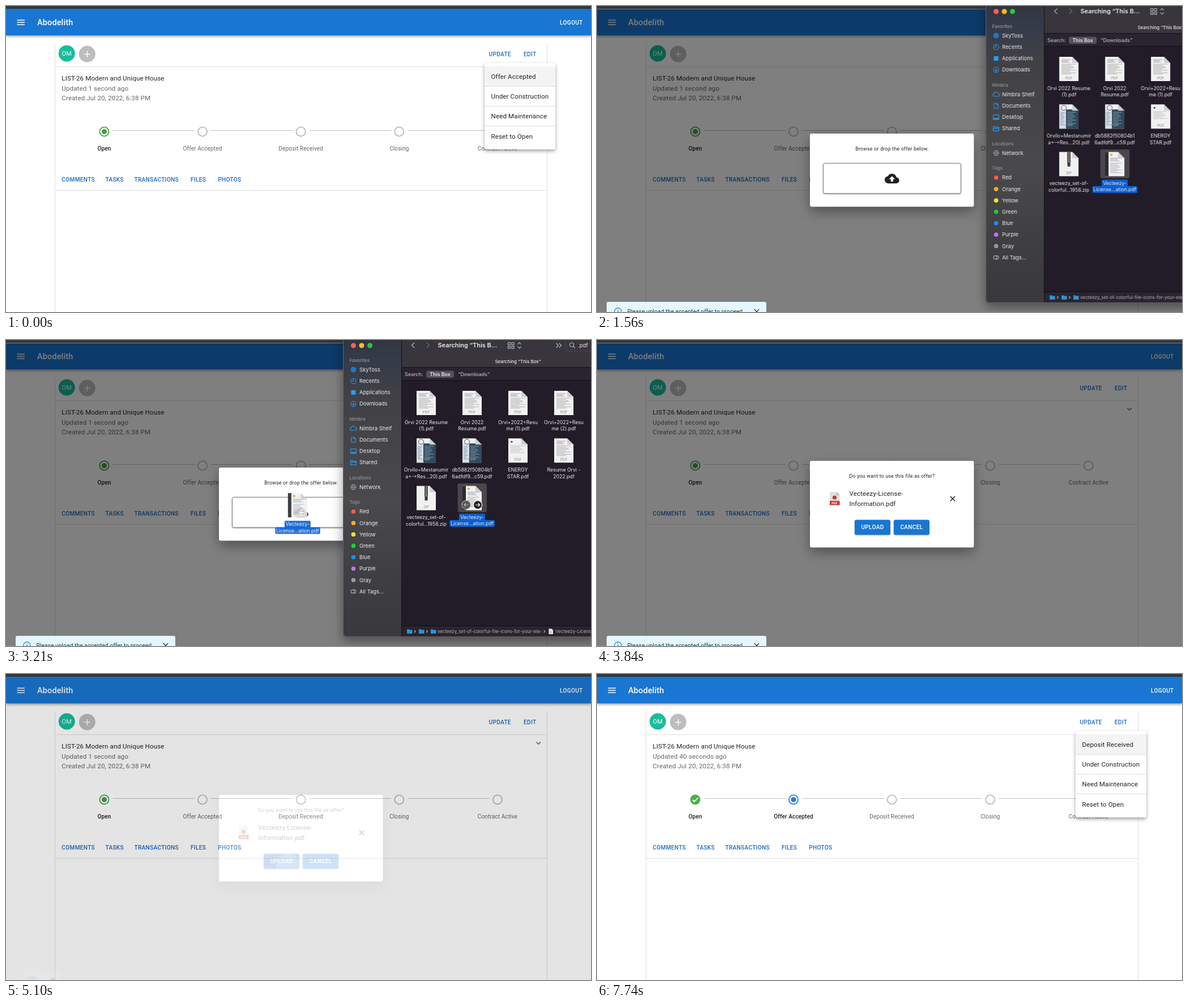
Write an HTML page that moves like this. It is 1033 px wide and 542 px high and loops after 8 s.

```html
<!DOCTYPE html>
<html lang="en">
<head>
<meta charset="utf-8">
<title>Listing workflow</title>
<style>
html, body { margin: 0; width: 100%; height: 100%; overflow: hidden; background: #fff; }
svg { display: block; width: 100vw; height: 100vh; }
text { white-space: pre; }
.ui { font: 400 11.6px Roboto, sans-serif; letter-spacing: .00938em; fill: #212121; }
.ui .soft { fill: #666; }
.ui .btn { font-size: 10.13px; font-weight: 500; letter-spacing: .02857em; fill: #1f6cbc; }
.ui .white { fill: #fff; }
.ui .cap { font-size: 8.7px; letter-spacing: .0333em; }
.ui .step { font-size: 10.13px; letter-spacing: .00714em; }
.ui .on { font-weight: 500; fill: #212121; }
.mid, .step, .cap { text-anchor: middle; }
.line { fill: none; stroke: #e0e0e0; }
.ring { fill: none; stroke: #b9b9b9; stroke-width: 1.8; }
.files { font: 400 9.4px Inter, sans-serif; fill: #eceaee; }
.files .head { font-size: 8px; font-weight: 600; fill: #8d8b92; }
.files .name { font-size: 8.7px; text-anchor: middle; }
.files .tag { font-size: 6.5px; text-anchor: middle; fill: #8b8b8b; }
.files .path { font-size: 8px; fill: #b5b2b9; }
.files .icon { fill: none; stroke: #2c9cf0; stroke-width: 1.1; }
.glyph { fill: none; stroke: #b9b6bd; stroke-width: 1.2; stroke-linecap: round; stroke-linejoin: round; }

#menu { filter: drop-shadow(0 3px 3px rgba(0,0,0,.36)); transform-origin: 920px 101px; }
.paper { filter: drop-shadow(0 9px 11px rgba(0,0,0,.36)); }
.raised { filter: drop-shadow(0 1.5px 1px rgba(0,0,0,.35)); }
#finder { filter: drop-shadow(0 7px 10px rgba(0,0,0,.4)); }
#toast { transform-origin: 158px 541px; }
#press { transform-origin: 498px 338px; }
#ripple { transform-origin: 874px 85px; }

#menu, #modal, #toast, #finder, #drag, #upload, #press, #hover, #ripple,
.before, .after, #ask, #confirm, #wide, #narrow, #arrows {
  animation: 8s linear infinite;
}
#menu { animation-name: menu; }
#modal { animation-name: modal; }
#toast { animation-name: toast; }
#finder { animation-name: finder; }
#drag { animation-name: drag; }
#upload { animation-name: upload; }
#press { animation-name: press; }
#hover { animation-name: hover; }
#ripple { animation-name: ripple; }
.before { animation-name: before; animation-timing-function: step-end; }
.after { animation-name: after; animation-timing-function: step-end; }
#ask { animation-name: ask; animation-timing-function: step-end; }
#confirm { animation-name: confirm; animation-timing-function: step-end; }
#wide { animation-name: wide; animation-timing-function: step-end; }
#narrow { animation-name: narrow; animation-timing-function: step-end; }
#arrows { animation-name: arrows; animation-timing-function: step-end; }

@keyframes menu {
  0%, 3% { opacity: 1; transform: none; animation-timing-function: cubic-bezier(.4,0,.2,1); }
  5.8% { opacity: 0; transform: scale(.75,.5625); }
  88.125% { opacity: 0; transform: scale(.75,.5625); animation-timing-function: cubic-bezier(.4,0,.2,1); }
  91.6%, 100% { opacity: 1; transform: none; }
}
@keyframes modal {
  0%, 3.2% { opacity: 0; animation-timing-function: cubic-bezier(.4,0,.2,1); }
  6.2%, 62.375% { opacity: 1; animation-timing-function: cubic-bezier(.4,0,.2,1); }
  65.1%, 100% { opacity: 0; }
}
@keyframes toast {
  0%, 3.375% { opacity: 0; transform: scale(.75,.5625); animation-timing-function: cubic-bezier(.4,0,.2,1); }
  6.6%, 62.375% { opacity: 1; transform: none; animation-timing-function: cubic-bezier(.4,0,.2,1); }
  65.1%, 100% { opacity: 0; transform: scale(.9,.8); }
}
@keyframes finder {
  0%, 17.5% { transform: translateX(475px); visibility: hidden; }
  17.51% { transform: translateX(475px); visibility: visible; animation-timing-function: cubic-bezier(.25,.5,.3,1); }
  22.125%, 46.49% { transform: none; visibility: visible; }
  46.5%, 100% { transform: none; visibility: hidden; }
}
@keyframes drag {
  0%, 31.86% { opacity: 0; transform: none; }
  31.875% { opacity: .9; transform: none; animation-timing-function: cubic-bezier(.4,.1,.4,1); }
  40.125% { opacity: .9; transform: translate(-308px,12.5px); animation-timing-function: ease-out; }
  41.625%, 42.37% { opacity: .9; transform: translate(-319px,21.5px); }
  42.375%, 100% { opacity: 0; transform: translate(-319px,21.5px); }
}
@keyframes upload {
  0%, 57.375% { fill: #1976d2; }
  60.5%, 100% { fill: #1565c0; }
}
@keyframes press {
  0%, 61.5% { transform: scale(0); opacity: .2; }
  65.25%, 100% { transform: scale(1); opacity: .25; }
}
@keyframes hover {
  0%, 86.5% { opacity: 0; }
  88.125% { opacity: .05; }
  91%, 100% { opacity: 0; }
}
@keyframes ripple {
  0%, 86.9% { opacity: .1; transform: scale(0); }
  88.5% { opacity: .26; transform: scale(.6); }
  91% { opacity: .14; transform: scale(1); }
  94.1%, 100% { opacity: 0; transform: scale(1); }
}
@keyframes before { 0% { opacity: 1; } 71.625%, 100% { opacity: 0; } }
@keyframes after { 0% { opacity: 0; } 71.625%, 100% { opacity: 1; } }
@keyframes ask { 0% { opacity: 1; } 46.5%, 100% { opacity: 0; } }
@keyframes confirm { 0% { opacity: 0; } 46.5%, 100% { opacity: 1; } }
@keyframes wide { 0% { opacity: 1; } 62.25%, 100% { opacity: 0; } }
@keyframes narrow { 0% { opacity: 0; } 62.25%, 100% { opacity: 1; } }
@keyframes arrows { 0% { opacity: 0; } 25.5%, 100% { opacity: 1; } }
</style>
</head>
<body>
<svg viewBox="0 0 1033 542">
  <defs>
    <linearGradient id="side" x1="0" y1="0" x2="0" y2="1">
      <stop offset="0" stop-color="#33343b"/><stop offset=".08" stop-color="#343b49"/>
      <stop offset=".2" stop-color="#414145"/><stop offset=".55" stop-color="#4a494c"/>
      <stop offset=".8" stop-color="#3f3e42"/><stop offset="1" stop-color="#39383c"/>
    </linearGradient>
    <clipPath id="uploadBox"><rect x="455" y="318.5" width="63" height="26.5" rx="3"/></clipPath>
    <clipPath id="updateBox"><rect x="844" y="72" width="59" height="27" rx="3"/></clipPath>
    <path id="times" d="M-4.2-4.2L4.2 4.2M4.2-4.2L-4.2 4.2"/>
  </defs>

  <g class="ui">
    <rect width="1033" height="542" fill="#fff"/>
    <path class="line" d="M86.5 66V542M955.5 66V542M86 107.5H956M86 326.5H956"/>
    <rect y="5" width="1033" height="47" fill="#1976d2" style="filter:drop-shadow(0 2px 2px rgba(0,0,0,.38))"/>
    <path d="M19.5 25H33M19.5 29H33M19.5 33H33" stroke="#fff" stroke-width="1.5"/>
    <text x="55" y="34" class="white" style="font-size:14.5px;font-weight:500">Abodelith</text>
    <text x="978" y="32.5" class="btn white" style="fill:#fff">LOGOUT</text>

    <circle cx="107.3" cy="84" r="14.5" fill="#1abc9c"/>
    <text x="107.3" y="88" class="mid white" style="font-size:11px">OM</text>
    <circle cx="143.3" cy="85" r="14.5" fill="#bdbdbd"/>
    <path d="M138 85.5H149M143.5 80V91" stroke="#fff" stroke-width="1.5"/>

    <g clip-path="url(#updateBox)" fill="#1976d2">
      <rect id="hover" x="844" y="72" width="59" height="27"/>
      <circle id="ripple" cx="874" cy="85" r="33"/>
    </g>
    <text x="852.5" y="89" class="btn">UPDATE</text>
    <text x="914" y="89" class="btn">EDIT</text>

    <text x="98.3" y="132">LIST-26 Modern and Unique House</text>
    <text x="98.3" y="149.5" class="soft before">Updated 1 second ago</text>
    <text x="98.3" y="149.5" class="soft after">Updated 40 seconds ago</text>
    <text x="98.3" y="166.5" class="soft">Created Jul 20, 2022, 6:38 PM</text>
    <path d="M936.5 120.5L940.3 124.3L944.1 120.5" fill="none" stroke="#616161" stroke-width="1.5"/>

    <g id="steps"></g>
    <g class="before" fill="#43a047">
      <circle cx="173.5" cy="222.5" r="8.1" fill="none" stroke="#43a047" stroke-width="1.8"/>
      <circle cx="173.5" cy="222.5" r="4.6"/>
      <text x="347" y="255.5" class="step soft">Offer Accepted</text>
    </g>
    <g class="before"><circle cx="347" cy="222.5" r="8.1" class="ring"/></g>
    <g class="after">
      <circle cx="173.5" cy="222.5" r="9" fill="#4caf50"/>
      <path d="M168.7 222.8L172 226L178.4 219.4" fill="none" stroke="#fff" stroke-width="1.8"/>
      <circle cx="347" cy="222.5" r="8.1" fill="none" stroke="#1e7fd8" stroke-width="1.8"/>
      <circle cx="347" cy="222.5" r="4.6" fill="#1e7fd8"/>
      <text x="347" y="255.5" class="step on">Offer Accepted</text>
    </g>

    <text x="98.3" y="311" class="btn">COMMENTS</text>
    <text x="175.6" y="311" class="btn">TASKS</text>
    <text x="226.5" y="311" class="btn">TRANSACTIONS</text>
    <text x="326" y="311" class="btn">FILES</text>
    <text x="374.3" y="311" class="btn">PHOTOS</text>

    <g id="menu">
      <rect x="845" y="101" width="125" height="153" rx="3" fill="#fff"/>
      <rect x="845" y="107" width="125" height="35" fill="#f4f4f4"/>
      <path class="line" d="M845 142.5H970M845 177.5H970M845 212.5H970"/>
      <text x="856.5" y="128.5" class="before">Offer Accepted</text>
      <text x="856.5" y="128.5" class="after">Deposit Received</text>
      <text x="856.5" y="164">Under Construction</text>
      <text x="856.5" y="199">Need Maintenance</text>
      <text x="856.5" y="234.5">Reset to Open</text>
    </g>

    <g id="modal">
      <rect y="5" width="1033" height="537" fill="#000" opacity=".5"/>
      <rect width="1033" height="5" fill="#4a4a4a"/>
      <path d="M0 5.5H1033" stroke="#777"/>
      <g id="ask">
        <rect class="paper" x="376" y="226" width="289.5" height="129.5" rx="3" fill="#fff"/>
        <text x="521" y="256" class="cap">Browse or drop the offer below.</text>
        <rect class="raised" x="399.5" y="278.5" width="243" height="53.5" rx="3" fill="#fff" stroke="#757575"/>
        <path transform="translate(508 292.8) scale(1.07)" d="M19.35 10.04C18.67 6.59 15.64 4 12 4 9.11 4 6.6 5.64 5.35 8.04 2.34 8.36 0 10.91 0 14c0 3.31 2.69 6 6 6h13c2.76 0 5-2.24 5-5 0-2.64-2.05-4.78-4.65-4.96zM14 13v4h-4v-4H7l5-5 5 5h-3z"/>
      </g>
      <g id="confirm">
        <rect class="paper" x="376" y="214" width="289.5" height="153.5" rx="3" fill="#fff"/>
        <text x="521" y="244" class="cap">Do you want to use this file as offer?</text>
        <path d="M411 269h12l5.5 5.5V292.5H411z" fill="#e2dfdc"/>
        <path d="M423 269l5.5 5.5H423z" fill="#bdb9b5"/>
        <circle cx="419.5" cy="279" r="3.6" fill="#c8382d"/>
        <rect x="411" y="285" width="17.5" height="7.5" fill="#c8382d"/>
        <text x="419.7" y="291" class="mid white" style="font-size:5.6px;font-weight:700">PDF</text>
        <text x="445.5" y="276">Vecteezy-License-</text>
        <text x="445.5" y="293.5">Information.pdf</text>
        <use href="#times" x="628" y="281" stroke="#212121" stroke-width="1.5"/>
        <g class="raised">
          <rect id="upload" x="455" y="318.5" width="63" height="26.5" rx="3"/>
          <rect x="524" y="318.5" width="63" height="26.5" rx="3" fill="#1976d2"/>
        </g>
        <g clip-path="url(#uploadBox)"><circle id="press" cx="498" cy="338" r="35" fill="#fff"/></g>
        <text x="486.5" y="335" class="btn mid" style="fill:#fff">UPLOAD</text>
        <text x="555.5" y="335" class="btn mid" style="fill:#fff">CANCEL</text>
      </g>
    </g>

    <g id="toast">
      <g id="wide">
        <rect x="17" y="524" width="282" height="35" rx="3" fill="#e5f6fd"/>
        <text x="53.5" y="545" style="font-size:10.13px;letter-spacing:.01071em;fill:#014361">Please upload the accepted offer to proceed.</text>
        <use href="#times" x="282" y="541.5" stroke="#014361" stroke-width="1.3"/>
      </g>
      <g id="narrow">
        <rect x="17" y="524" width="75.5" height="35" rx="3" fill="#e5f6fd"/>
        <use href="#times" x="76" y="541.5" stroke="#014361" stroke-width="1.3"/>
      </g>
      <circle cx="37" cy="541" r="6.2" fill="none" stroke="#0288d1" stroke-width="1.2"/>
      <path d="M37 537.5v1.4M37 540v4" stroke="#0288d1" stroke-width="1.3"/>
    </g>
    <rect width="1033" height="5" fill="#35383b"/>
  </g>

  <g id="finder" class="files">
    <path d="M595-10H1045V526H602a7 7 0 0 1-7-7z" fill="#211c27"/>
    <path d="M595-10H698V526H602a7 7 0 0 1-7-7z" fill="url(#side)"/>
    <rect x="699" y="-10" width="346" height="58" fill="#38353d"/>
    <rect x="699" y="49" width="346" height="22.5" fill="#29242f"/>
    <rect x="699" y="507" width="346" height="19" fill="#29252e"/>
    <path d="M698.5-10V526M699 48.5H1045M699 71.5H1045M699 506.5H1045" stroke="#121016"/>
    <path d="M595.5-10V519a7 7 0 0 0 7 6.5H1045" fill="none" stroke="#706e74" stroke-width=".8"/>
    <circle cx="613.5" cy="9.7" r="4.5" fill="#ff5f57"/>
    <circle cx="628" cy="9.7" r="4.5" fill="#febc2e"/>
    <circle cx="642.5" cy="9.7" r="4.5" fill="#28c840"/>
    <g id="places"></g>

    <path class="glyph" d="M721 5l-4.5 4.3 4.5 4.3M904 7.2l2.6-2.8 2.6 2.8M904 11.8l2.6 2.8 2.6-2.8M972 6l3.5 3.5-3.5 3.5M977 6l3.5 3.5-3.5 3.5M1001.8 11.3l2.6 2.7M886.5 4.5h4v4h-4zM893 4.5h4v4h-4zM886.5 10.8h4v4h-4zM893 10.8h4v4h-4z"/>
    <path class="glyph" d="M743 5l4.5 4.3-4.5 4.3" opacity=".45"/>
    <circle class="glyph" cx="999" cy="8.5" r="3.5"/>
    <path d="M1045 19.5H992a4 4 0 0 1-4-4V0" fill="none" stroke="#4b4850"/>
    <text x="762.5" y="13.3" style="font-size:10.9px;font-weight:600">Searching “This B…</text>
    <text x="1010" y="13">.pdf</text>
    <text x="904" y="41" class="mid" style="font-size:8px;font-weight:500">Searching “This Box”</text>
    <rect x="742" y="54.5" width="49" height="12.5" rx="3" fill="#55515b"/>
    <g style="font-size:8.8px;font-weight:600">
      <text x="704" y="63.7" fill="#aaa7ae">Search:</text>
      <text x="766.5" y="63.7" class="mid">This Box</text>
      <text x="798" y="63.7" fill="#aaa7ae">“Downloads”</text>
    </g>
    <rect x="797.5" y="254" width="51.5" height="51" rx="3" fill="#49464d"/>
    <g id="docs"></g>
    <g id="picked"></g>
    <g id="arrows" stroke="#fff" stroke-width="1.2">
      <circle cx="812.5" cy="292" r="7.6" fill="#555" stroke="#aaa"/>
      <circle cx="833" cy="292" r="7.6" fill="#222"/>
      <path d="M816.3 292h-7.4m3-3l-3 3 3 3" fill="none" stroke="#bbb"/>
      <path d="M829.2 292h7.4m-3-3l3 3-3 3" fill="none"/>
    </g>
    <g fill="#2b93dc">
      <path d="M708 512.5h3.5l1 1H717.500v6.500H708zM729 512.5h3.5l1 1H738.500v6.500H729zM750 512.5h3.5l1 1H759.500v6.500H750z"/>
    </g>
    <path class="glyph" d="M721.500 514.500l1.700 1.800-1.700 1.800M742.500 514.500l1.700 1.800-1.700 1.800M950 514.500l1.700 1.800-1.700 1.800" stroke-width=".9"/>
    <text x="762" y="519" class="path">vecteezy_set-of-colorful-file-icons-for-your-ele‹</text>
    <path d="M958.500 511.500h5l2.500 2.500v7h-7.500z" fill="#eee"/>
    <path d="M960 516h4.500M960 518.500h4.500" stroke="#888" stroke-width=".8"/>
    <text x="970" y="519" class="path">Vecteezy-License-Information.pdf</text>
  </g>
  <g id="drag" class="files"></g>
</svg>

<script>
const put = (id, html) => document.getElementById(id).innerHTML = html;
const label = (x, y, s, cls) => `<text x="${x}" y="${y}" class="${cls}">${s}</text>`;

// Progress stepper
put('steps', ['Open', '', 'Deposit Received', 'Closing', 'Contract Active'].map((name, i) => {
  const x = 173.5 + 173.6 * i;
  return (i < 4 ? `<path d="M${x + 15} 220.5H${x + 159.5}" stroke="#bdbdbd"/>` : '') +
    (i > 1 ? `<circle cx="${x}" cy="222.5" r="8.1" class="ring"/>` : '') +
    label(x, 255.5, name, i ? 'step soft' : 'step on');
}).join(''));

// Sidebar
const icons = {
  dot: '<circle r="5" fill="#1f78c8" stroke="none"/>',
  clock: '<circle r="4.6"/><path d="M0-3V0H-2.500"/>',
  square: '<rect x="-4" y="-4" width="8" height="8" fill="#2c9cf0" stroke="none"/>',
  down: '<circle r="4.600"/><path d="M0-2.500V2.300M-2 .500L0 2.500L2 .500"/>',
  cloud: '<path d="M-3 3.500a2.500 2.500 0 0 1-.500-5a3.700 3.700 0 0 1 7-.500a2.800 2.800 0 0 1 0 5.500z"/>',
  page: '<path d="M-3.500-4.500H1L3.500-2V4.500H-3.500zM1-4.500V-2H3.500"/>',
  desk: '<rect x="-5" y="-4" width="10" height="8" rx="1"/><path d="M-4 2.500H4" stroke-width="2"/>',
  folder: '<path d="M-5 4V-3.500H-1.500L-.500-2.500H5V4zM-5-.500H5"/>',
  globe: '<g stroke="#aaa" stroke-width=".9"><circle r="4.500"/><ellipse rx="2" ry="4.500"/><path d="M-4.500 0H4.500"/></g>',
  all: '<g stroke="#aaa"><circle cx="-1.500" r="3"/><path d="M0-3H1.500a3 3 0 0 1 0 6H0"/></g>'
};
const tag = color => `<circle r="3.800" fill="${color}" stroke="none"/>`;
const groups = [
  ['Favorites', 39, 52.5, [['SkyToss', icons.dot], ['Recents', icons.clock], ['Applications', icons.square], ['Downloads', icons.down]]],
  ['Nimbra', 143, 156.5, [['Nimbra Shelf', icons.cloud], ['Documents', icons.page], ['Desktop', icons.desk], ['Shared', icons.folder]]],
  ['Locations', 247, 260.5, [['Network', icons.globe]]],
  ['Tags', 290, 304, [['Red', tag('#ff5d55')], ['Orange', tag('#ffb01f')], ['Yellow', tag('#ffdf2e')], ['Green', tag('#1fcf3e')],
    ['Blue', tag('#1c8cff')], ['Purple', tag('#c673f0')], ['Gray', tag('#9a999d')], ['All Tags…', icons.all]]]
];
put('places', groups.map(([title, y, top, rows]) => label(606.5, y, title, 'head') +
  rows.map(([name, icon], i) => {
    const cy = top + 20.2 * i;
    return `<g class="icon" transform="translate(613.5 ${cy})">${icon}</g>` + label(624, cy + 3.3, name, '');
  }).join('')).join(''));

// Document thumbnails
const rules = (x, y, w, n, gap, color) => Array.from({ length: n }, (_, i) =>
  `<path d="M${x} ${y + i * gap}h${w * (.78 + .22 * Math.sin(i * 2.7 + 1))}" stroke="${color}" stroke-width=".9"/>`).join('');
const looks = {
  text: rules(4, 5, 17, 3, 2.2, '#999') + rules(4, 13, 26, 9, 2.2, '#aaa'),
  blue: '<path d="M12 9H34V43H12z" fill="#2f4a60"/><path d="M0 9H12V43H0z" fill="#d5dde3"/><circle cx="8" cy="6" r="4.500" fill="#eee" stroke="#555"/>' +
    rules(14, 14, 16, 9, 2.8, '#91a5b4') + rules(2, 15, 8, 8, 3, '#718798'),
  plain: '<circle cx="6" cy="6" r="1.500" fill="#333"/>' + rules(4, 13, 25, 6, 2.4, '#bbb'),
  zip: '<path d="M14 0h6v24h-6z" fill="#444"/><path d="M17 1v18" stroke="#bbb" stroke-width="3" stroke-dasharray="1 1.500"/><rect x="14.500" y="18" width="5" height="8" rx="1.500" fill="#333" stroke="#aaa" stroke-width=".8"/>',
  book: '<path d="M0 0H6V43H0z" fill="#2b2b2d"/><circle cx="11" cy="5" r="2" fill="#eba43a"/>' +
    rules(9, 11, 20, 3, 2.3, '#8aa0b8') + rules(9, 20, 20, 8, 2.4, '#aaa')
};
const doc = (x, y, look, kind) => `<g transform="translate(${x - 17} ${y})">
  <path d="M0 0H23L34 11V43H0z" fill="#f1f1f1"/>${looks[look]}
  <path d="M23 0L34 11H23z" fill="#cfcfcf"/>${label(17, 39.5, kind, 'tag')}</g>`;
const files = [
  [['text', 'Orvi 2022 Resume', '(1).pdf'], ['text', 'Orvi 2022', 'Resume.pdf'], ['text', 'Orvi+2022+Resu', 'me (1).pdf'], ['text', 'Orvi+2022+Resu', 'me (2).pdf']],
  [['blue', 'Orvilo+Mestanumir', 'a+-+Res…20).pdf'], ['blue', 'db5882f50804b1', '6adfdf9…c59.pdf'], ['plain', 'ENERGY', 'STAR.pdf'], ['text', 'Resume Orvi -', '2022.pdf']],
  [['zip', 'vecteezy_set-of-', 'colorful…1958.zip']]
];
put('docs', files.map((row, r) => row.map(([look, a, b], c) => {
  const x = 742 + 81 * c, y = 90 + 84.2 * r;
  return doc(x, y, look, look === 'zip' ? 'ZIP' : 'PDF') + label(x, y + 59, a, 'name') + label(x, y + 70.4, b, 'name');
}).join('')).join(''));

const picked = doc(823, 258.5, 'book', '') +
  '<path d="M802 307.500H844a2 2 0 0 1 2 2V319H861a2 2 0 0 1 2 2V329a2 2 0 0 1-2 2H785.500a2 2 0 0 1-2-2V321a2 2 0 0 1 2-2H800V309.500a2 2 0 0 1 2-2z" fill="#0b5fd0"/>' +
  label(823, 316.8, 'Vecteezy-', 'name') + label(823, 328, 'License…ation.pdf', 'name');
put('picked', picked);
put('drag', picked);
</script>
</body>
</html>
```
